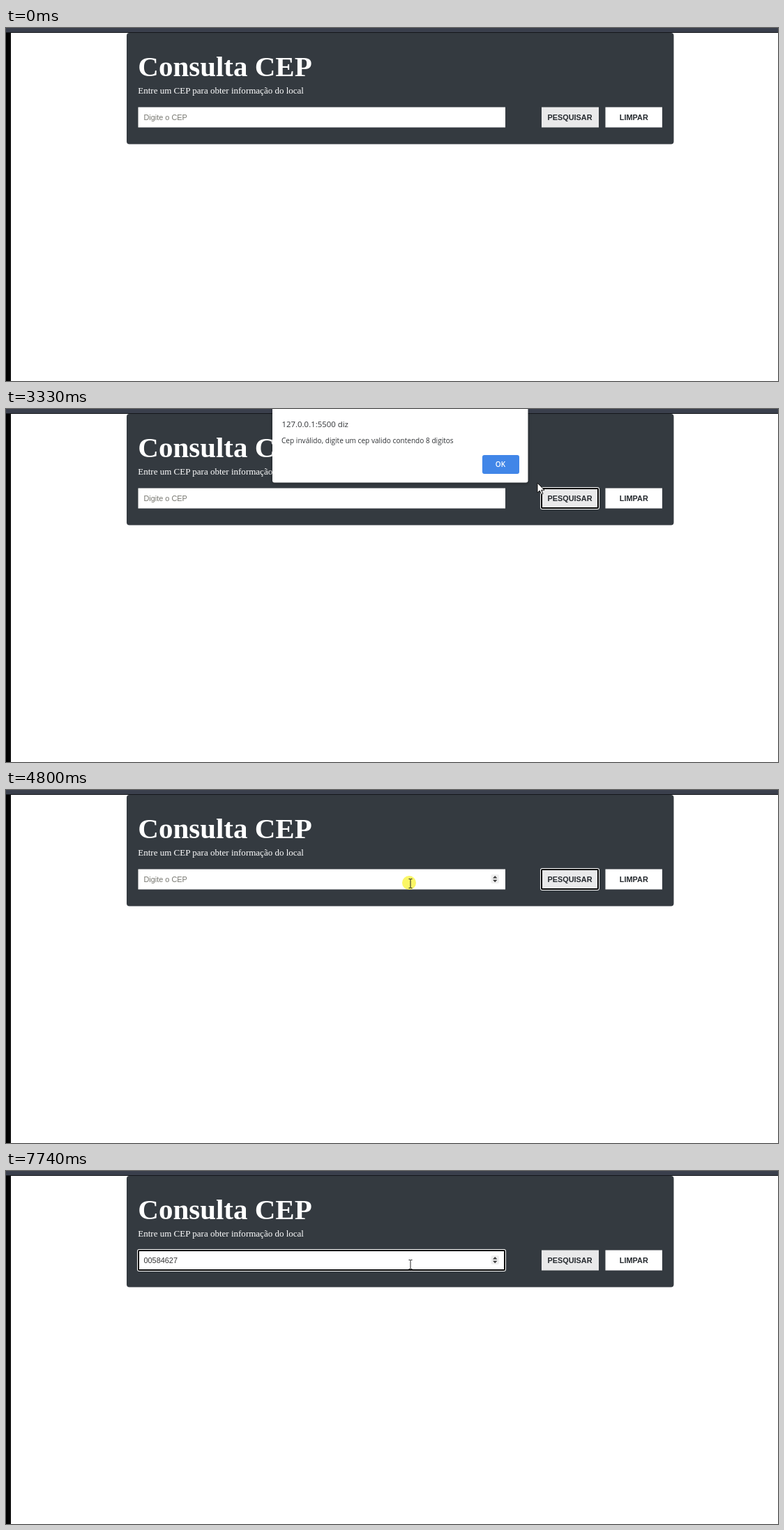
Recreate the animation shown at these times as an HTML page. Size 1107 by 506 pixels, loop 8000 ms.

```html
<!DOCTYPE html>
<html lang="pt-BR">
<head>
<meta charset="utf-8">
<title>Consulta CEP</title>
<style>
  html, body { margin: 0; width: 100%; height: 100%; overflow: hidden; background: #fff; }
  svg { display: block; }
  text { white-space: pre; }
  .serif { font-family: "Liberation Serif", "Times New Roman", serif; fill: #fff; }
  .field { font: 10.9px "Liberation Sans", Arial, sans-serif; }
  .button { font: bold 10.9px "Liberation Sans", Arial, sans-serif; fill: #24282d; text-anchor: middle; }
  .ui { font-family: "Open Sans", "Noto Sans", sans-serif; fill: #303336; }
  #dialog rect:first-child { filter: drop-shadow(0 1px 2px rgba(0, 0, 0, .4)); }
  #list rect { filter: drop-shadow(0 1px 1px rgba(0, 0, 0, .35)); }
</style>
</head>
<body>
<svg width="1107" height="506" viewBox="0 0 1107 506">
  <rect width="1107" height="506" fill="#fff"/>
  <rect y="6" width="7" height="500"/>
  <rect width="1107" height="6" fill="#3a3f4c"/>
  <rect y="6" width="1107" height="1" fill="#15171b"/>
  <rect x="173" y="7" width="784.5" height="159.5" rx="4" fill="#343a40"/>
  <text class="serif" x="189.3" y="69" font-size="41" font-weight="bold">Consulta CEP</text>
  <text class="serif" x="189.3" y="94" font-size="13.03">Entre um CEP para obter informação do local</text>

  <g id="inputRing">
    <rect x="188" y="112" width="529" height="32" rx="3" fill="#fff"/>
    <rect x="189" y="113" width="527" height="30" rx="2"/>
  </g>
  <rect id="input" fill="#fff"/>
  <text id="value" class="field" x="197.5" y="132"></text>
  <rect id="caret" y="122" width="1" height="12"/>
  <g id="spinner">
    <rect x="695.5" y="121" width="11.5" height="13" rx="2" fill="#efefef"/>
    <path d="M698 126.5 701.2 123 704.4 126.5ZM698 128.8 701.2 132.3 704.4 128.8Z" fill="#3c3c3c"/>
  </g>

  <g id="buttonRing">
    <rect x="766" y="112" width="85" height="32" rx="3" fill="#fff"/>
    <rect x="767" y="113" width="83" height="30" rx="2"/>
  </g>
  <rect id="search" fill="#e9e9ea"/>
  <text class="button" x="808.5" y="132">PESQUISAR</text>
  <rect x="859.5" y="113.5" width="81.5" height="29" fill="#fff"/>
  <text class="button" x="900.3" y="132">LIMPAR</text>

  <g id="list">
    <rect x="189.5" y="144" width="157" height="42" rx="2" fill="#fff"/>
    <text class="ui" x="199" y="168.3" font-size="9.8" font-weight="500">00584-639</text>
  </g>

  <g id="dialog">
    <rect x="382" y="-10" width="366.5" height="115.5" rx="3" fill="#fff"/>
    <text class="ui" x="395.5" y="26" font-size="11.4">127.0.0.1:5500 diz</text>
    <text class="ui" x="395" y="49" font-size="10.1">Cep inválido, digite um cep valido contendo 8 digitos</text>
    <rect x="683" y="66" width="53" height="27" rx="3" fill="#4186e8"/>
    <text class="ui" x="709" y="83" font-size="10" font-weight="600" text-anchor="middle" style="fill:#fff">OK</text>
  </g>

  <circle id="click" r="10" fill="#f6f000" fill-opacity=".6"/>
  <g id="cursor" stroke-linejoin="round">
    <path id="arrow" d="M0 0V14L3.3 11 5.8 16.5 8 15.5 5.7 10.2H10Z" fill="#fff" stroke="#111"/>
    <path id="hand" d="M-1.5 10V1.2Q0-.8 1.5 1.2V6.2Q3 5 4 6.8 5.5 5.8 6.5 7.4 8.5 6.8 8.7 9V13Q8.5 15.5 7 17V19.3H-1V17L-5 11.8Q-5.4 9.2-3 9.6ZM1.5 6.2V10M4 7V10.5M6.5 7.6V10.8" fill="#fff" stroke="#111"/>
    <path id="beam" d="M-2.5-6.5H-.8L0-5.8 .8-6.5H2.5M0-5.8V5.8M-2.5 6.5H-.8L0 5.8 .8 6.5H2.5" fill="none" stroke="#222"/>
  </g>
</svg>
<script>
const LOOP = 8000, CODE = "00584627", DIGIT = 6.06;
const KEYS = [5640, 5810, 6050, 6370, 6670, 6830, 7040, 7190];
const $ = id => document.getElementById(id);

// time, x, y, pointer shape
const POINTER = [
  [460, 1092, 490, "arrow"], [530, 930, 362, "arrow"], [610, 820, 279, "arrow"],
  [920, 817, 240, "arrow"], [1000, 812, 175, "arrow"], [1070, 809, 143, "arrow"],
  [1530, 805, 134, "hand"], [1640, 803.5, 126.5, "hand"],
  [3250, 790, 122, "arrow"], [3330, 762, 106, "arrow"], [3410, 728, 88, "arrow"],
  [3480, 700, 75, "arrow"], [3560, 684, 70, "arrow"], [3640, 702, 76, "arrow"],
  [3720, 716.5, 81.5, "arrow"],
  [4430, 690, 97, "arrow"], [4500, 622, 121, "beam"], [4570, 580, 134, "beam"]
];
// time, opacity, vertical offset
const DIALOG = [
  [2080, .55, -4], [2180, .945, -1.5], [2270, 1, 0],
  [4090, .985, 0], [4170, .5, -1], [4250, 0, 0]
];
// start, end, x, y
const CLICKS = [[1860, 2080, 804, 128], [3860, 4010, 717, 83], [4800, 5040, 578, 133]];

const latest = (track, t) => track.findLast(step => t >= step[0]);
const within = (t, from, to = LOOP) => t >= from && t < to;
const show = (id, on) => $(id).style.display = on ? "" : "none";

function setBox(id, x, y, width, height) {
  Object.entries({ x, y, width, height }).forEach(([name, v]) => $(id).setAttribute(name, v));
}

function drawForm(t) {
  const buttonFocus = within(t, 1940, 4900), inputFocus = within(t, 4900);
  show("buttonRing", buttonFocus);
  show("inputRing", inputFocus);
  if (buttonFocus) setBox("search", 769, 115, 79, 26);
  else setBox("search", 768, 113.5, 82, 29);
  if (inputFocus) setBox("input", 191, 115, 523, 26);
  else setBox("input", 189.5, 113.5, 526.5, 29);

  const typed = KEYS.filter(key => t >= key).length;
  $("value").textContent = CODE.slice(0, typed) || "Digite o CEP";
  $("value").setAttribute("fill", typed ? "#333" : "#777770");
  $("caret").setAttribute("x", Math.round(198 + typed * DIGIT));
  show("caret", within(t, 4900, 5330) || within(t, 5640, 7740));
  show("spinner", within(t, 4500));
  show("list", within(t, 4900, 6830));
}

function drawDialog(t) {
  const [, opacity, dy] = latest(DIALOG, t) || [0, 0, 0];
  show("dialog", opacity);
  $("dialog").setAttribute("opacity", opacity);
  $("dialog").setAttribute("transform", `translate(0 ${dy})`);
}

function drawPointer(t) {
  const pose = latest(POINTER, t);
  show("cursor", pose);
  if (pose) {
    const [, x, y, shape] = pose;
    $("cursor").setAttribute("transform", `translate(${x} ${y})`);
    ["arrow", "hand", "beam"].forEach(id => show(id, id === shape));
  }
  const click = CLICKS.find(([from, to]) => within(t, from, to));
  show("click", click);
  if (click) $("click").setAttribute("transform", `translate(${click[2]} ${click[3]})`);
}

const start = performance.now();
function frame() {
  const t = (performance.now() - start) % LOOP;
  drawForm(t);
  drawDialog(t);
  drawPointer(t);
  requestAnimationFrame(frame);
}
frame();
</script>
</body>
</html>
```
